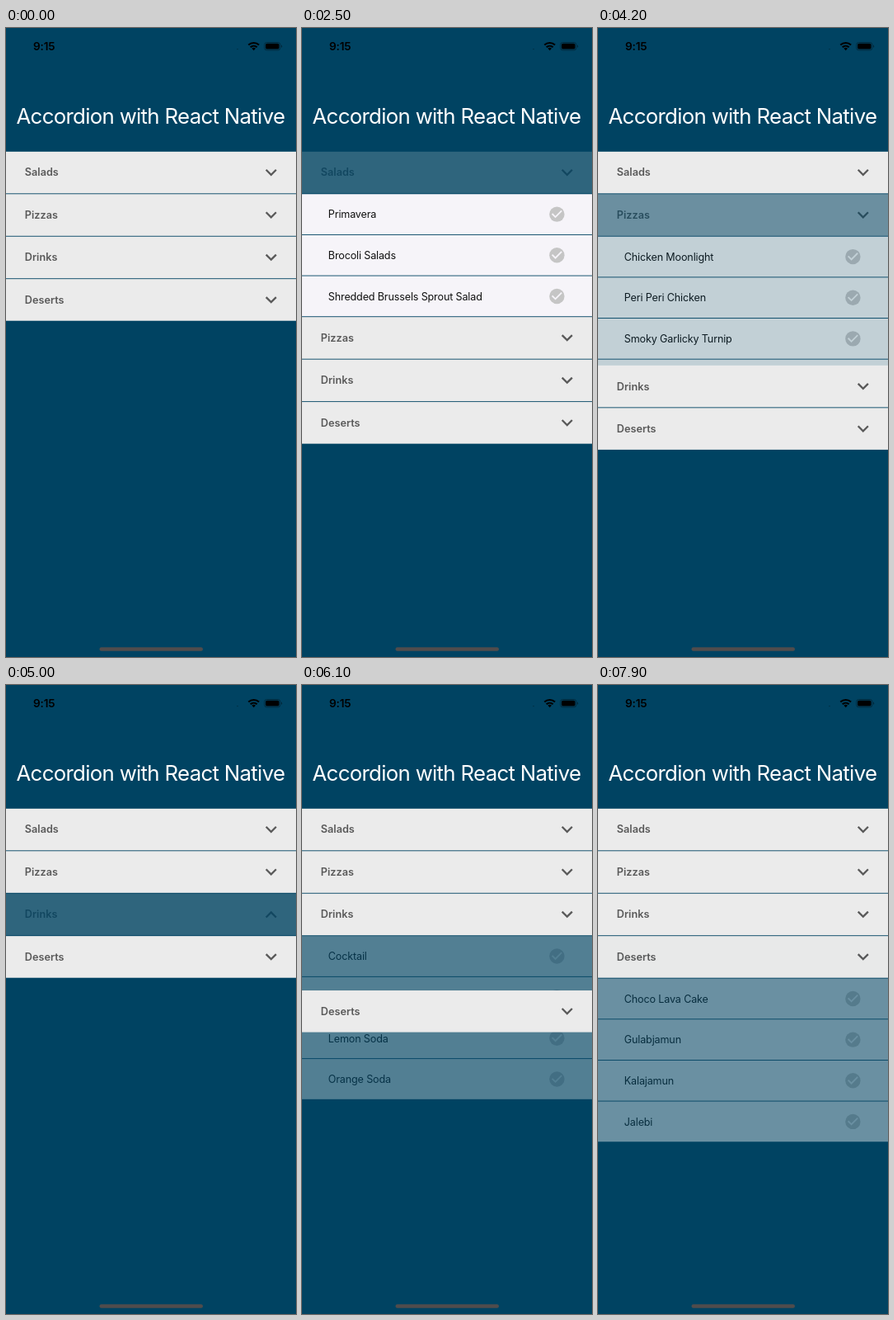
Write an HTML page that moves like this. It is 352 px wide and 762 px high and loops after 8 s.

```html
<!DOCTYPE html>
<html lang="en">
<head>
<meta charset="utf-8">
<title>Accordion</title>
<style>
  html, body { margin: 0; width: 100%; height: 100%; overflow: hidden; background: #004362; }
  svg { display: block; width: 352px; height: 762px; }
  text { font-family: Inter, Roboto, sans-serif; }
  .title { font-size: 25.8px; letter-spacing: -.69px; fill: #fff; text-anchor: middle; }
  .clock { font-size: 13.6px; font-weight: 600; letter-spacing: -.2px; }
  .head { font-size: 12.7px; font-weight: 600; fill: #595959; }
  .item { font-size: 12.6px; letter-spacing: -.16px; fill: #111; }
</style>
</head>
<body>
<svg id="stage" viewBox="0 0 352 762">
  <rect width="352" height="762" fill="#004362"/>
  <text class="clock" x="33" y="27.4">9:15</text>
  <circle cx="281" cy="25.6" r=".6" opacity=".5"/>
  <g fill="none" stroke="#000" stroke-width="2.1">
    <path d="M294.3 20.6a9.2 9.2 0 0 1 12.8 0M296.7 23.3a5.8 5.8 0 0 1 8 0"/>
  </g>
  <path d="M300.7 27.2l-2.3-2.4a3.3 3.3 0 0 1 4.6 0z"/>
  <g opacity=".4">
    <rect x="313.8" y="17.5" width="19" height="9.4" rx="2.6" fill="none" stroke="#000" stroke-width=".9"/>
    <path d="M334 20.6a1.7 1.7 0 0 1 0 3.2z"/>
  </g>
  <rect x="315.1" y="18.8" width="16.4" height="6.8" rx="1.6"/>
  <text class="title" x="175.4" y="116">Accordion with React Native</text>
  <g id="accordion"></g>
  <rect x="113.5" y="750.2" width="125.5" height="4.5" rx="2.2" fill="#504c4c"/>
</svg>
<script>
const LOOP = 8000, STEP = 100;
const TOP = 149.8, HEAD = 51.45, ROW = 49.64, GAP = 0.9;
const LAYOUT_MS = 300, PRESS_MS = 100, RELEASE_MS = 250, DIM = 0.2;

const sections = [
  { title: 'Salads', fill: '#f6f4f9', items: ['Primavera', 'Brocoli Salads', 'Shredded Brussels Sprout Salad'] },
  { title: 'Pizzas', fill: '#f6f6f6', items: ['Chicken Moonlight', 'Peri Peri Chicken', 'Smoky Garlicky Turnip', 'Margherita'] },
  { title: 'Drinks', fill: '#f6f6f6', items: ['Cocktail', 'Mocktail', 'Lemon Soda', 'Orange Soda'] },
  { title: 'Deserts', fill: '#f6f6f6', items: ['Choco Lava Cake', 'Gulabjamun', 'Kalajamun', 'Jalebi'] }
];

// Each section is tapped twice: open, then close.
const tap = (down, release, layout) => ({ down, release, layout });
const taps = [
  [tap(1200, 1300, 1300), tap(2400, 2500, 2500)],
  [tap(3200, 3300, 3300), tap(4000, 4100, 4104)],
  [tap(4900, 5000, 5000), tap(5770, 5855, 5920)],
  [tap(6600, 6700, 6700), tap(7600, 7670, 7738)]
];

const clamp = v => Math.max(0, Math.min(1, v));
const inOutQuad = t => t < 0.5 ? 2 * t * t : 1 - 2 * (1 - t) ** 2;

// cubic-bezier(.42, 0, .58, 1), solved by bisection
function easeInOut(x) {
  if (x <= 0 || x >= 1) return clamp(x);
  let lo = 0, hi = 1;
  for (let i = 0; i < 20; i++) {
    const s = (lo + hi) / 2;
    const bx = 1.26 * s * (1 - s) ** 2 + 1.74 * s * s * (1 - s) + s ** 3;
    if (bx < x) lo = s; else hi = s;
  }
  return lo * lo * (3 - 2 * lo);
}

function add(parent, tag, attrs = {}, text) {
  const el = document.createElementNS('http://www.w3.org/2000/svg', tag);
  for (const key in attrs) el.setAttribute(key, attrs[key]);
  if (text) el.textContent = text;
  parent.append(el);
  return el;
}

function build(section) {
  const root = add(document.getElementById('accordion'), 'g');
  const head = add(root, 'g');
  add(head, 'rect', { width: 352, height: HEAD - GAP, fill: '#ebebeb' });
  add(head, 'text', { class: 'head', x: 22.8, y: 29.7 }, section.title);
  const chevron = add(head, 'path', {
    d: 'M-4.59-3.7L0 .88l4.59-4.58L6-2.29l-6 6-6-6z', fill: '#595959'
  });
  const list = add(root, 'g', { transform: `translate(0 ${HEAD})` });
  section.items.forEach((name, i) => {
    const row = add(list, 'g', { transform: `translate(0 ${i * ROW})` });
    add(row, 'rect', { width: 352, height: ROW - GAP, fill: section.fill });
    add(row, 'text', { class: 'item', x: 31.8, y: 29.1 }, name);
    add(row, 'circle', { cx: 309.4, cy: 24.4, r: 9.2, fill: '#c5c5c5' });
    add(row, 'path', {
      d: 'M-2 5l-5-5 1.41-1.41L-2 2.17l7.59-7.59L7-4z', fill: section.fill,
      transform: 'translate(309.4 24.4) scale(.92)'
    });
  });
  return { root, head, chevron, list };
}

const views = sections.map(build);

function headOpacity(pair, t) {
  const last = pair.filter(p => t >= p.down).pop();
  if (!last) return 1;
  const amount = t < last.release
    ? inOutQuad(clamp((t - last.down) / PRESS_MS))
    : 1 - inOutQuad(clamp((t - last.release) / RELEASE_MS));
  return 1 - (1 - DIM) * amount;
}

function render(t) {
  let y = TOP;
  views.forEach((view, i) => {
    const [open, close] = taps[i];
    const progress = p => easeInOut((t - p.layout) / LAYOUT_MS);
    const shown = progress(open) - progress(close);
    const isOpen = t >= open.release && t < close.release;
    view.root.setAttribute('transform', `translate(0 ${y})`);
    view.head.setAttribute('opacity', headOpacity(taps[i], t));
    view.chevron.setAttribute('transform', `translate(321.8 25.4) scale(1.15 ${isOpen ? -1.15 : 1.15})`);
    view.list.setAttribute('opacity', shown);
    y += HEAD + shown * ROW * sections[i].items.length;
  });
}

let start;
function tick(now) {
  start ??= now;
  render(Math.floor((now - start) % LOOP / STEP) * STEP);
  requestAnimationFrame(tick);
}
render(0);
requestAnimationFrame(tick);
</script>
</body>
</html>
```
